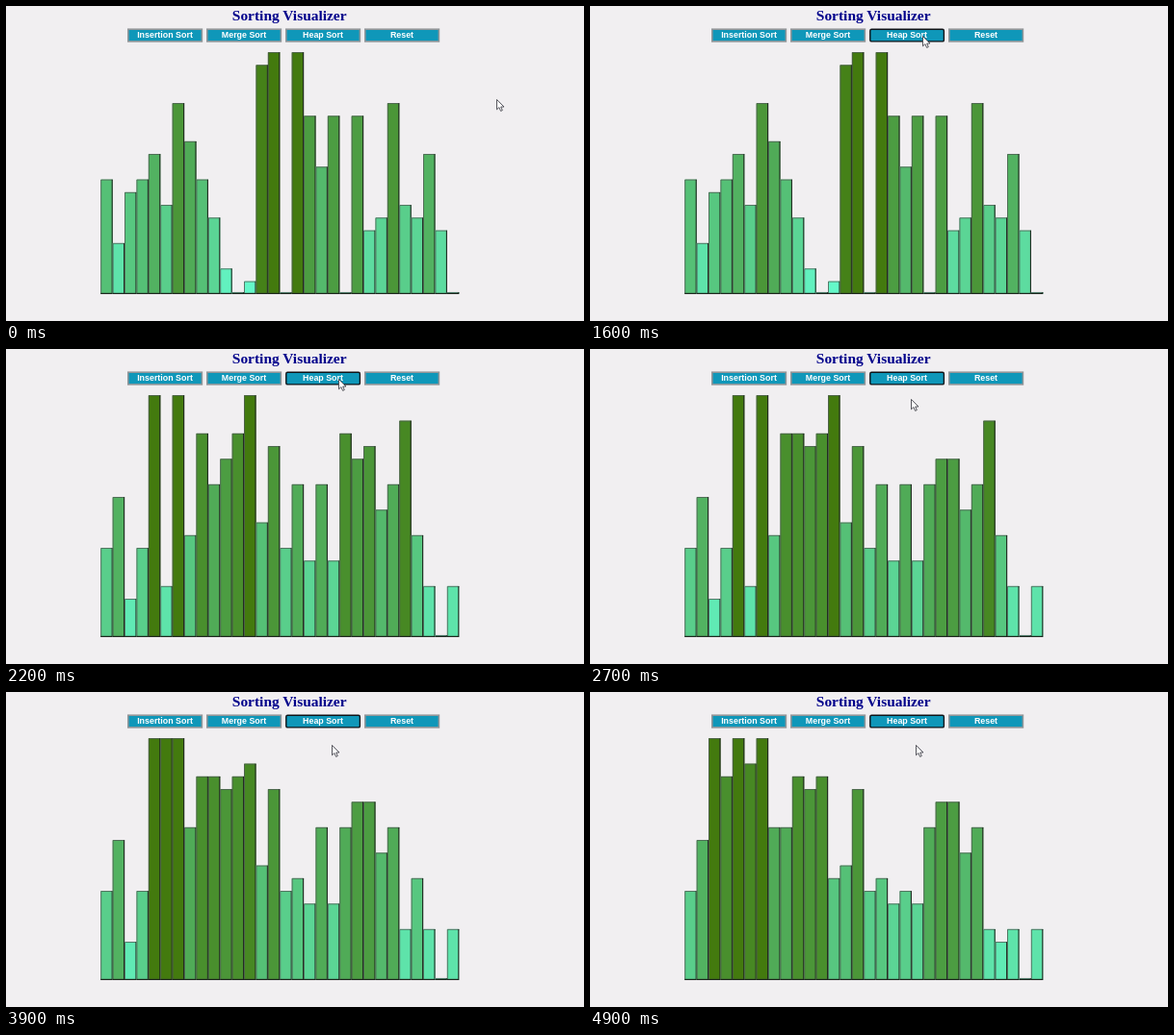
Animation, 600 px wide and 328 px high, one loop 5000 ms. Source, as an HTML page:

```html
<!DOCTYPE html>
<html lang="en">
<head>
<meta charset="utf-8">
<title>Sorting Visualizer</title>
<style>
  html, body { margin: 0; width: 100%; height: 100%; overflow: hidden; background: #f1eff1; }
  svg { display: block; width: 600px; height: 328px; }
  text { text-anchor: middle; font-weight: bold; }
  .title { font-family: "Liberation Serif", "Times New Roman", serif; font-size: 15.45px; fill: #00008b; }
  .label { font-family: "Liberation Sans", Arial, sans-serif; font-size: 8.9px; fill: #fff; }
</style>
</head>
<body>
<svg id="stage" viewBox="0 0 600 328">
  <rect width="600" height="328" fill="#f1eff1"/>
  <text class="title" x="294.2" y="14.8">Sorting Visualizer</text>
  <g id="buttons"></g>
  <g id="bars"></g>
  <path id="cursor" d="M.5 .4V10.8L2.9 8.6L4.6 12.4L6.3 11.6L4.7 8H8z"
        fill="#fff" stroke="#44444c" stroke-width=".9" stroke-linejoin="round"/>
</svg>
<script>
const LOOP = 5000, STEP = 100;
const LEFT = 98.3, PITCH = 12.4, BASE = 299.9, UNIT = 13.25;
const NEW_ARRAY = 1700, PRESS = 1500;

const before = [9, 4, 8, 9, 11, 7, 15, 12, 9, 6, 2, 0, 1, 18, 19,
  0, 19, 14, 10, 14, 0, 14, 5, 6, 15, 7, 6, 11, 5, 0];
const after = [7, 11, 3, 7, 19, 4, 19, 8, 16, 12, 14, 16, 19, 9, 15,
  7, 12, 6, 12, 6, 16, 14, 15, 10, 12, 17, 8, 4, 0, 4];

// Heap building: [time, parent, child]
const swaps = [
  [2400, 10, 22], [2600, 9, 20], [3000, 7, 16], [3400, 5, 12], [3600, 12, 25],
  [4200, 3, 8], [4300, 8, 18], [4600, 2, 5], [4700, 5, 12], [4800, 12, 26]
];

// Pointer path: [time, x, y]
const path = [
  [0, 509, 97], [100, 500, 94], [600, 385, 55], [700, 377, 52],
  [1200, 345, 31], [2400, 345, 31], [2700, 333, 52],
  [3000, 333, 52], [3600, 338, 55], [5000, 338, 55]
];

const $ = id => document.getElementById(id);

function add(parent, tag, attrs) {
  const el = document.createElementNS("http://www.w3.org/2000/svg", tag);
  set(el, attrs);
  parent.append(el);
  return el;
}

function set(el, attrs) {
  for (const key in attrs) el.setAttribute(key, attrs[key]);
}

const buttons = ["Insertion Sort", "Merge Sort", "Heap Sort", "Reset"].map((name, i) => {
  const mid = 165 + 82 * i;
  const box = add($("buttons"), "rect", { x: mid - 38.2, y: 24.2, width: 76.6, height: 12.7, fill: "#0f97b9" });
  add($("buttons"), "text", { class: "label", x: mid, y: 33.3 }).textContent = name;
  return box;
});

const bars = before.map((_, i) => {
  const x = LEFT + PITCH * i;
  return {
    x,
    body: add($("bars"), "rect", { x, width: PITCH }),
    light: add($("bars"), "path", { fill: "none", stroke: "#4b5a50", "stroke-width": .8 }),
    dark: add($("bars"), "path", { fill: "none", stroke: "#202820", "stroke-width": 1.1 })
  };
});

function color(v) {
  return `rgb(${102 - 1.8 * v | 0},${255 - 7 * v | 0},${212 - 10.4 * v | 0})`;
}

function valuesAt(t) {
  if (t < NEW_ARRAY) return before;
  const list = after.slice();
  for (const [at, a, b] of swaps) {
    if (t >= at) [list[a], list[b]] = [list[b], list[a]];
  }
  return list;
}

function pointerAt(t) {
  const i = path.findIndex(p => p[0] > t);
  const [t0, x0, y0] = path[i - 1], [t1, x1, y1] = path[i];
  const k = (t - t0) / (t1 - t0);
  return [x0 + (x1 - x0) * k, y0 + (y1 - y0) * k];
}

function draw(t) {
  valuesAt(t).forEach((v, i) => {
    const { x, body, light, dark } = bars[i];
    const h = Math.max(1.9, UNIT * v), top = BASE - h, right = x + PITCH;
    set(body, { y: top, height: h, fill: color(v) });
    set(light, { d: `M${x + .4} ${BASE}V${top + .4}H${right}` });
    set(dark, { d: `M${right - .5} ${top}V${BASE - .5}H${x}` });
  });
  buttons.forEach((box, i) => {
    const focused = i === 2 && t >= PRESS;
    set(box, { rx: focused ? 1.5 : 0, stroke: focused ? "#101418" : "#929699", "stroke-width": focused ? 1.4 : 1.6 });
  });
  set($("cursor"), { transform: `translate(${pointerAt(t)})` });
}

const start = performance.now();
function tick() {
  const t = (performance.now() - start) % LOOP;
  draw(Math.floor(t / STEP) * STEP);
  requestAnimationFrame(tick);
}
tick();
</script>
</body>
</html>
```
